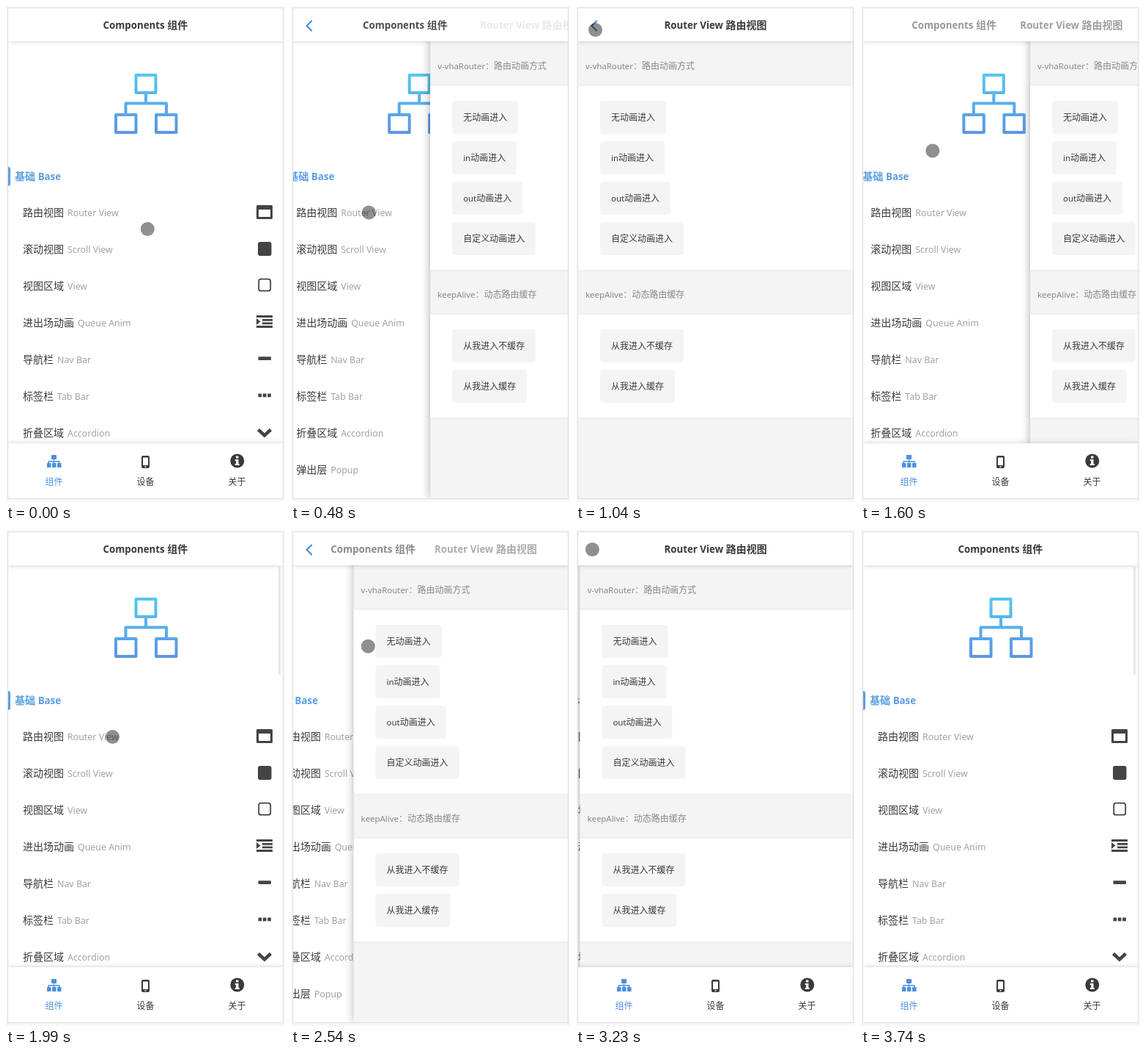
Recreate the animation shown at these times as an HTML page. Size 381 by 675 pixels, loop 5.81 s.

```html
<!DOCTYPE html>
<html lang="zh-CN">
<head>
<meta charset="utf-8">
<style>
html, body { margin: 0; width: 100%; height: 100%; overflow: hidden; background: #f8f8f8; }
body { font: 12px "Noto Sans", "Noto Sans CJK SC", sans-serif; color: #3a3a3a; position: relative; }
div, svg { position: absolute; white-space: nowrap; }
i { font-style: normal; font-size: .95em; }
#phone { left: 3px; top: 3px; width: 375px; height: 667px; overflow: hidden; background: #fff; outline: 1px solid #ddd; }
.fill { left: 0; top: 0; width: 375px; height: 667px; }
#detail { background: #f4f4f4; box-shadow: 0 0 12px rgba(0,0,0,.32); }
#header { width: 375px; height: 45px; background: #fff; box-shadow: 0 0 6px rgba(0,0,0,.22); }
.title { width: 375px; text-align: center; font: bold 14px/46px "Noto Sans", "Noto Sans CJK SC", sans-serif; }
#tabs { top: 592px; width: 375px; height: 75px; background: #fff; box-shadow: 0 0 6px rgba(0,0,0,.22); }
#tabs div { width: 125px; top: 43px; line-height: 20px; text-align: center; }
.section { left: 0; top: 216px; padding-left: 9px; font-weight: bold; font-size: 14px; line-height: 26px; color: #5a9fe4; }
.section::before { content: ""; position: absolute; left: 0; top: 0; width: 3px; height: 26px; border-radius: 0 3px 3px 0; background: #5a9fe4; }
.row { left: 20px; font-size: 14px; line-height: 50px; }
.row i { font-size: 12.4px; color: #a2a2a2; margin-left: 5px; }
.label { left: 10px; line-height: 20px; color: #888; }
.panel { left: 0; width: 375px; background: #fff; box-shadow: 0 0 6px rgba(0,0,0,.05); }
.button { left: 30px; height: 45px; padding: 0 15px; line-height: 46px; border-radius: 4px; background: #f4f4f4; }
#scrollbar { left: 369px; top: 47px; width: 3px; height: 147px; border-radius: 2px; background: #e8e8e8; }
#cursor { width: 19px; height: 19px; margin: -9.5px; border-radius: 50%; background: rgba(0,0,0,.44); }
</style>
</head>
<body>
<div id="phone">
  <div id="list" class="fill">
    <svg class="fill" viewBox="3 3 375 667" fill="#444">
      <linearGradient id="sky" gradientUnits="userSpaceOnUse" x1="0" x2="0" y1="92" y2="174">
        <stop stop-color="#54c8f1"/><stop offset="1" stop-color="#5c94e4"/>
      </linearGradient>
      <path fill="none" stroke="url(#sky)" stroke-width="4" stroke-linejoin="round"
        d="M177.500 94h27v24h-27zM150 148h27.500v24H150zM205 148h27.500v24H205zM191 118v14M163.500 148v-15.500H219V148"/>
      <path fill-rule="evenodd" d="M343.500 271h19q1.500 0 1.500 1.500v16q0 1.500-1.500 1.500h-19q-1.500 0-1.500-1.500v-16q0-1.500 1.500-1.500zM345 277v10h16v-10z"/>
      <rect x="344" y="321" width="18.500" height="19" rx="3"/>
      <rect x="345.200" y="371.700" width="16" height="16" rx="3" fill="none" stroke="#444" stroke-width="1.800"/>
      <path d="M342 421h22v3h-22zM350 426h14v2.800h-14zM350 430.500h14v2.800h-14zM342 435h22v3h-22zM342 425l5.500 4.500-5.500 4.500z"/>
      <rect x="344.500" y="477.300" width="17.500" height="4.700" rx="1"/>
      <path d="M344.500 527.500h4.700v4.700h-4.700zM350.800 527.500h4.700v4.700h-4.700zM357.200 527.500h4.700v4.700h-4.700z"/>
      <path d="M344.500 576.500l8.500 8 8.500-8" fill="none" stroke="#444" stroke-width="4.500"/>
    </svg>
    <div class="section">基础 <i>Base</i></div>
    <div id="scrollbar"></div>
  </div>
  <div id="detail" class="fill"></div>
  <div id="header">
    <div id="listTitle" class="title"><i>Components</i> 组件</div>
    <div id="detailTitle" class="title"><i>Router View</i> 路由视图</div>
    <svg id="back" class="fill" viewBox="3 3 375 667"><path d="M28.500 20l-7 7 7 7" fill="none" stroke="#4488cc" stroke-width="2"/></svg>
  </div>
  <div id="tabs">
    <svg width="375" height="75" viewBox="3 595 375 75" fill="#3a3a3a">
      <path fill="#4a90e2" d="M62 611h7v6h-3v2h7.500v3H75.500v6H70v-6h2v-1.500h-5.800V622H68.500v6H63v-6h1.800v-1.500H59V622h2.500v6H56v-6h1.500v-3H65v-2h-3z"/>
      <path fill-rule="evenodd" d="M187 612h7q2 0 2 2v13q0 2-2 2h-7q-2 0-2-2v-13q0-2 2-2zM187 614.500v10.500h7v-10.500zM189.500 626.300v1.400h2v-1.400z"/>
      <circle cx="315.800" cy="619" r="9.500"/>
      <path fill="#fff" d="M314 612.500h3.500v3H314zM312.800 617h4.700v6h1.300v2h-6v-2h1.300v-4h-1.300z"/>
    </svg>
    <div style="color:#4a90e2">组件</div>
    <div style="left:125px">设备</div>
    <div style="left:250px">关于</div>
  </div>
</div>
<div id="cursor"></div>
<script>
const $ = id => document.getElementById(id);
const LOOP = 5810, DURATION = 400, WIDTH = 375;

function add(parent, className, top, html, height) {
  const el = document.createElement('div');
  el.className = className;
  el.style.top = top + 'px';
  if (height) el.style.height = height + 'px';
  el.innerHTML = html;
  parent.append(el);
}

['路由视图<i>Router View</i>', '滚动视图<i>Scroll View</i>', '视图区域<i>View</i>',
 '进出场动画<i>Queue Anim</i>', '导航栏<i>Nav Bar</i>', '标签栏<i>Tab Bar</i>',
 '折叠区域<i>Accordion</i>', '弹出层<i>Popup</i>'
].forEach((html, n) => add($('list'), 'row', 253 + n * 50, html));

function addGroup(top, label, buttons) {
  add($('detail'), 'label', top - 37, label);
  add($('detail'), 'panel', top, '', 30 + buttons.length * 55);
  buttons.forEach((html, n) => add($('detail'), 'button', top + 20 + n * 55, html));
}
addGroup(106, '<i>v-vhaRouter</i>：路由动画方式',
  ['无动画进入', '<i>in</i>动画进入', '<i>out</i>动画进入', '自定义动画进入']);
addGroup(417, '<i>keepAlive</i>：动态路由缓存', ['从我进入不缓存', '从我进入缓存']);

const moves = [
  { start: -DURATION, open: false },
  { start: 420, open: true },
  { start: 1480, open: false },
  { start: 2420, open: true },
  { start: 3230, open: false }
];

// time, x, y
const path = [
  [0, 193, 303], [400, 106, 281], [480, 106, 281], [1040, 26, 32], [1480, 26, 32],
  [1600, 97, 196], [1800, 145, 281], [2420, 145, 281], [2540, 105, 158],
  [2990, 23, 27], [3050, 22, 26], [3230, 22, 26], [3400, -15, 40], [LOOP, -15, 40]
];

function cursorAt(t) {
  const n = path.findIndex(point => point[0] > t);
  const [t0, x0, y0] = path[n - 1], [t1, x1, y1] = path[n];
  const k = (t - t0) / (t1 - t0);
  return [x0 + (x1 - x0) * k, y0 + (y1 - y0) * k];
}

const shift = (id, x, y = 0) => $(id).style.transform = `translate(${x}px, ${y}px)`;
const show = (id, on) => $(id).style.visibility = on ? 'visible' : 'hidden';

function render(t) {
  const { start, open } = moves.findLast(move => move.start <= t);
  const u = Math.min(1, (t - start) / DURATION);
  const slide = 1 - (1 - u) ** (open ? 4.2 : 2.6);
  const swap = 1 - (1 - u ** 1.5) ** (open ? 5 : 4);
  const page = open ? slide : 1 - slide;
  const title = open ? swap : 1 - swap;
  const fade = open ? title ** 1.7 : title;

  shift('list', -63 * page * page);
  shift('detail', WIDTH * (1 - page));
  show('detail', page > 0);
  shift('listTitle', -131 * title);
  shift('detailTitle', WIDTH / 2 * (1 - title));
  $('listTitle').style.opacity = 1 - fade;
  $('detailTitle').style.opacity = fade;
  show('back', open);
  show('tabs', !open);
  show('scrollbar', t >= 1480);
  shift('cursor', ...cursorAt(t));
}

const began = performance.now();
function tick() {
  render((performance.now() - began) % LOOP);
  requestAnimationFrame(tick);
}
$('cursor').style.left = $('cursor').style.top = 0;
tick();
</script>
</body>
</html>
```
